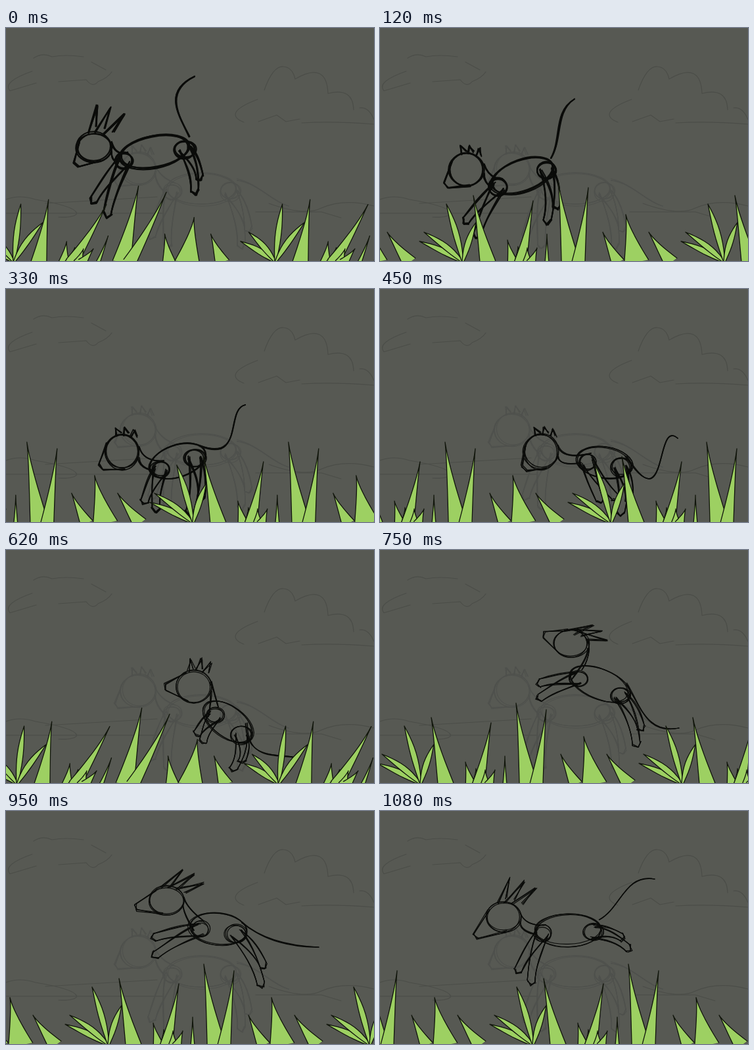
An HTML page with a canvas that plays this animation: 560 px wide and 356 px high, repeating every 1120 ms.

```html
<!DOCTYPE html>
<html>
<head>
<meta charset="utf-8">
<style>
html, body { margin: 0; width: 100%; height: 100%; overflow: hidden; background: #575953; }
canvas { display: block; }
</style>
</head>
<body>
<canvas id="stage" width="560" height="356"></canvas>
<script>
const ctx = document.getElementById('stage').getContext('2d');
const LOOP = 1120, STEPS = 27, TILE = 398;

// Joints of the running dog; bend shapes the tail, ground is the scroll of the grass.
const poses = [
  { step: 0, ground: 12, head: [135, 182], nose: [107, 209], chest: [180, 203], hip: [272, 185],
    front: [154, 283], hind: [287, 249], tail: [287, 74], bend: [-20, -45] },
  { step: 6, ground: 240, head: [131, 250], nose: [94, 270], chest: [181, 283], hip: [235, 248],
    front: [142, 348], hind: [222, 338], tail: [305, 143], bend: [28, 0] },
  { step: 11, ground: 352, head: [246, 248], nose: [219, 274], chest: [316, 264], hip: [366, 272],
    front: [358, 318], hind: [366, 342], tail: [453, 228], bend: [120, -40] },
  { step: 15, ground: 415, head: [287, 208], nose: [242, 210], chest: [318, 253], hip: [358, 282],
    front: [300, 292], hind: [346, 334], tail: [445, 318], bend: [50, 10] },
  { step: 18, ground: 460, head: [291, 143], nose: [249, 129], chest: [302, 196], hip: [366, 222],
    front: [243, 226], hind: [390, 296], tail: [455, 272], bend: [10, 40] },
  { step: 23, ground: 554, head: [245, 137], nose: [198, 147], chest: [296, 181], hip: [350, 187],
    front: [228, 220], hind: [388, 264], tail: [476, 208], bend: [18, 12] },
  { step: 26, ground: 631, head: [188, 162], nose: [145, 191], chest: [247, 187], hip: [325, 185],
    front: [230, 260], hind: [378, 210], tail: [418, 104], bend: [5, -35] }
];
const ghost = { head: [202, 215], nose: [168, 238], chest: [252, 250], hip: [342, 250],
  front: [246, 332], hind: [358, 332], tail: [430, 272], bend: [-10, 5] };

// Leaf tips around their shared root; blades as tip x, height, root x, root width.
const leaves = [[-66, 32], [-59, 46], [-25, 89], [20, 61]];
const blades = [[16, 102, 38, 24], [68, 34, 76, 16], [84, 24, 86, 16], [107, 94, 88, 19], [98, 22, 98, 14],
  [113, 22, 104, 14], [128, 43, 128, 6], [145, 124, 164, 28], [191, 114, 176, 20], [213, 46, 236, 20],
  [248, 73, 264, 38], [283, 46, 317, 22]];

const clouds = new Path2D(`M40 66Q-6 82 6 96L46 84M42 46Q56 37 70 44Q90 40 118 44
  M130 52l22 12M80 82L122 79Q132 92 140 82Q155 76 161 67
  M393 95Q406 58 422 59Q436 60 440 78Q488 50 490 100Q528 90 529 125M538 122Q552 120 560 140
  M383 109Q328 130 362 144M384 143L412 133L426 143L447 139M450 145Q500 142 560 147`);
const hills = new Path2D(`M0 262Q20 254 45 262Q104 272 108 283Q105 290 80 289M60 268L230 258
  M0 283H240M400 268Q455 288 480 275Q515 260 560 272M380 281H480l30 9`);

const mix = (a, b, u) => a + (b - a) * u;
const blend = (a, b, u) => a.length ? a.map((v, i) => mix(v, b[i], u)) : mix(a, b, u);
const polar = ([x, y], angle, rx, ry = rx) => [x + Math.cos(angle) * rx, y + Math.sin(angle) * ry];
const heading = (a, b) => Math.atan2(b[1] - a[1], b[0] - a[0]);
const distance = (a, b) => Math.hypot(b[0] - a[0], b[1] - a[1]);

// A point u of the way from a to b, moved sideways.
const beside = (a, b, u, side) => polar(blend(a, b, u), heading(a, b) + Math.PI / 2, side);

let seed = 1;
function shake(size) {
  seed = seed * 16807 % 2147483647;
  return (seed / 2147483647 - .5) * size;
}

// Every stroke is drawn several times with a little wobble.
function scribble(shape) {
  for (let pass = 0; pass < 3; pass++) {
    ctx.beginPath();
    shape(p => p.map(v => v + shake(3.5)));
    ctx.stroke();
  }
}

function line(...points) {
  scribble(jog => points.forEach(p => ctx.lineTo(...jog(p))));
}

function curve(a, b, c, d = c) {
  scribble(jog => {
    ctx.moveTo(...jog(a));
    ctx.bezierCurveTo(...jog(b), ...jog(c), ...d);
  });
}

function ring(center, rx, ry = rx, turn = 0) {
  scribble(jog => ctx.ellipse(...jog(center), rx + shake(3), ry + shake(3), turn, 0, 7));
}

function limb(joint, foot, bend) {
  for (const side of [-1, 1])
    curve(beside(joint, foot, 0, side * 9), beside(joint, foot, .35, bend + side * 9),
      beside(joint, foot, .7, bend + side * 5), beside(joint, foot, 1, side * 6));
  line(beside(joint, foot, 1, -6), beside(joint, foot, 1.08, 0), beside(joint, foot, 1, 6));
}

// The far leg is the near one, turned and shortened.
function legs(joint, foot, bend, turn, scale) {
  limb(joint, polar(joint, heading(joint, foot) + turn, distance(joint, foot) * scale), bend);
  limb(joint, foot, bend);
}

function drawDog({ head, nose, chest, hip, front, hind, tail, bend }, color, ink) {
  ctx.strokeStyle = color;
  ctx.lineWidth = ink;
  const ry = 21 + (head[1] - 140) * .05;
  const snout = heading(head, nose);
  const rim = angle => polar(head, angle, 26, ry);

  ring(head, 26, ry);
  line(rim(snout + 1.1), beside(head, nose, 1, 5), beside(head, nose, 1, -5), rim(snout - 1.1));

  // Ears stand up near the ground and stream back in the air.
  const flow = Math.max(0, Math.min(1, (215 - head[1]) / 30));
  const back = mix(-1.4, Math.atan2(head[1] - nose[1], head[0] - nose[0]) - .25, flow);
  for (const spread of [-.25, 0, .25]) {
    const root = rim(-1.5 + spread * 1.8);
    const tip = polar(root, back + spread, mix(12, 44, flow));
    line(root, tip, beside(root, tip, .3, 8));
  }

  curve(rim(-.3), polar(rim(.2), 1, 14), polar(chest, -1.2, 14));
  curve(rim(.3), polar(rim(.6), 1.2, 12), polar(chest, 3, 10));

  const [x, y] = blend(chest, hip, .5);
  ring([x, y - 4], 32 + distance(chest, hip) * .22, 24, heading(chest, hip));
  ring(chest, 13, 12);
  ring(hip, 15, 13);
  legs(chest, front, 3, .35, .9);
  legs(hip, hind, -6, -.25, .75);

  const rump = [hip[0] + 8, hip[1] - 18];
  curve(rump, beside(rump, tail, .35, bend[0]), beside(rump, tail, .7, bend[1]), tail);
}

const flare = t => (1 - t) ** 1.5;
const leaf = t => Math.sin(Math.PI * (.08 + .92 * t));

// Outline along a bent spine; profile gives the half width from root to tip.
function plant(rootX, width, tipX, height, bow, profile) {
  const spine = t => [
    rootX + (tipX - rootX) * mix(t, t * t, bow),
    358 - height * mix(t, t * t, -bow)
  ];
  ctx.beginPath();
  for (let i = -10; i <= 10; i++) {
    const t = 1 - Math.abs(i) / 10;
    const [x, y] = spine(1 - t);
    const [nx, ny] = spine(1 - t + .01);
    const half = Math.sign(i) * width / 2 * profile(1 - t);
    const turn = Math.atan2(ny - y, nx - x) + Math.PI / 2;
    ctx.lineTo(x + Math.cos(turn) * half, y + Math.sin(turn) * half);
  }
  ctx.fill();
  ctx.stroke();
}

// The upper half runs root to tip and back, so order the samples by side.
function grow(rootX, width, tipX, height, bow, profile) {
  const edge = [];
  for (let i = 0; i <= 20; i++) {
    const side = i < 10 ? -1 : 1;
    const t = 1 - Math.abs(i - 10) / 10;
    const x = mix(rootX, tipX, mix(t, t * t, bow));
    const y = 358 - height * mix(t, t * (2 - t), Math.abs(bow) * .5);
    const slope = Math.atan2(height, Math.abs(tipX - rootX));
    const half = side * width / 2 * profile(t);
    edge.push([x + half * Math.sin(slope), y + half * Math.cos(slope) * Math.sign(tipX - rootX)]);
  }
  ctx.beginPath();
  edge.forEach(p => ctx.lineTo(...p));
  ctx.fill();
  ctx.stroke();
}

function drawGrass(ground, lean) {
  ctx.fillStyle = '#9dd062';
  ctx.strokeStyle = '#11150c';
  ctx.lineWidth = 1.3;
  for (let x = ground % TILE - TILE; x < 640; x += TILE) {
    for (const [tip, height, root, width] of blades)
      grow(x + root, width, x + tip + lean * height * .36, height * (1 - lean * .06), -.3, flare);
    for (const [tip, height] of leaves)
      grow(x, 9, x + tip + lean * height * .4, height, .2, leaf);
  }
}

function draw(now) {
  const time = Math.floor(now % LOOP / 10) * 10;
  const step = Math.min(STEPS - 1, Math.floor((time + 9.9) * .024));
  const next = Math.max(1, poses.findIndex(p => p.step >= step));
  const from = poses[next - 1], to = poses[next];
  const u = (step - from.step) / (to.step - from.step);
  const pose = {};
  for (const part in from) pose[part] = blend(from[part], to[part], u);

  ctx.fillStyle = '#575953';
  ctx.fillRect(0, 0, 560, 356);
  ctx.lineCap = ctx.lineJoin = 'round';
  ctx.strokeStyle = '#4b4d48';
  ctx.lineWidth = 1.2;
  ctx.stroke(clouds);
  ctx.stroke(hills);

  seed = 5;
  drawDog(ghost, '#4f514d', 1.1);
  seed = step * 977 + 31;
  drawDog(pose, '#0a0b09', 1.2 + Math.max(0, 1 - step / 14));

  // The blades lean forward around the start and mid-loop.
  const lean = Math.max(0, 1 - Math.min(step, Math.abs(step - 15)) / 3);
  drawGrass(pose.ground, lean);
}

// Drop the sampled outline helper that is not needed at run time.
const start = performance.now();
function tick() {
  draw(performance.now() - start);
  requestAnimationFrame(tick);
}
tick();
</script>
</body>
</html>
```
